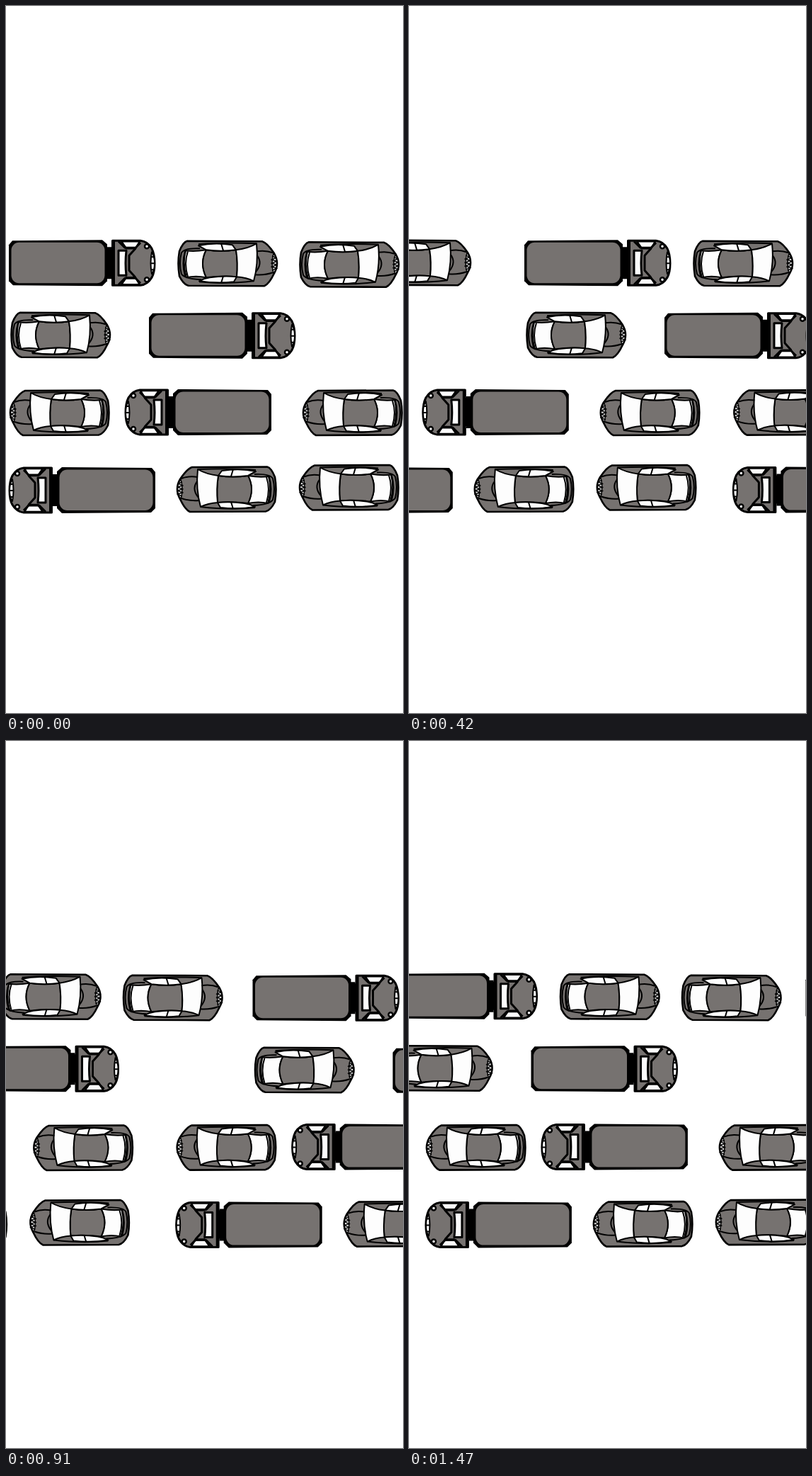
Animation of 561 by 998 pixels, one loop 1.54 s. Source, as an HTML page:

```html
<!DOCTYPE html>
<html lang="en">
<head>
<meta charset="utf-8">
<title>Traffic</title>
<style>
  html, body { margin: 0; width: 100%; height: 100%; overflow: hidden; background: #fff; }
  svg { display: block; width: 100vw; height: 100vh; }
  .line { fill: none; }
  .glass { fill: #fdfdfd; }
  .ink { fill: #000; stroke: none; }
</style>
</head>
<body>
<svg viewBox="0 0 561 998">
  <defs>
    <g id="car" fill="#767270" stroke="#000" stroke-width="2" stroke-linejoin="round">
      <path stroke-width="2.6" d="M14 1.5 L120 2 Q127 4 137 19 Q145 33 137 47 Q130 62 123 65 L16 64.5 Q9 63 3 51 Q0 33 3 16 Q8 3 14 1.5Z"/>
      <path class="line" d="M32 12 Q10 11 6 18 Q2 33 6 48 Q10 55 34 56 M28 16 H11 Q6 33 11 51 H30"/>
      <path class="glass" d="M12 15 Q24 17 41 14 Q31 33 41 53 Q26 50 13 53 Q7 33 12 15Z"/>
      <path class="line" d="M15 16 Q9 33 15 52"/>
      <path d="M41 14 Q62 17 83 14 Q86 33 84 52 Q62 50 41 53 Q31 33 41 14Z"/>
      <path class="glass" d="M83 14 Q100 12 112 5 Q115 33 108 58 Q98 53 84 52 Q86 33 83 14Z"/>
      <path class="glass" d="M30 8 Q52 3 78 7 L83 14 Q62 17 41 14Z"/>
      <path class="glass" d="M31 58 Q38 54 46 53 Q66 50 84 52 L80 59 Q56 62 31 58Z"/>
      <path class="line" d="M30 6 Q62 3 112 5 M31 59 Q66 63 108 58 M62 5 L65 15 M62 61 L65 51"/>
      <path class="line" d="M112 16 Q125 14 135 18 M110 49 Q124 50 135 46 M113 22 Q121 33 111 45"/>
      <path class="glass" stroke-width="1.5" d="M136 19 Q132 33 136 47 L139 42 Q142 33 139 24Z"/>
      <path class="line" stroke-width="1.5" d="M134 23 L140 25 L133 28 L141 30 L133 33 L141 35 L133 38 L141 40 L134 43"/>
    </g>
    <g id="truck" fill="#767270" stroke="#000" stroke-width="3" stroke-linejoin="round">
      <path class="ink" d="M137 10 h8 v2 h7 v40 h-7 v3 h-8Z"/>
      <path class="ink" d="M5 1 L132 0 L139 6 V58 L132 65 L6 64 L0 58 V7Z"/>
      <rect x="3.5" y="3.500" width="132" height="57.500" rx="11" stroke="none"/>
      <path d="M146.500 1 H186 Q196 2 202 12 Q206 20 206 33 Q206 46 202 53 Q196 63 186 64 H146.500Z"/>
      <path class="glass" stroke-width="2.500" d="M159 2 H185 L179 12 H166Z M159 63 H185 L179 53 H166Z"/>
      <path class="glass" d="M155 15 H166 Q164 33 166 50 H155Z"/>
      <path class="line" stroke-width="4" d="M148 1 V64"/>
      <path class="line" d="M155 2 L164 11 H179 L186 4 M155 63 L164 54 H179 L186 61 M179 12 L170 22 V43 L179 53"/>
      <path class="glass" stroke-width="2" d="M202 17 Q199 33 202 48 Q206 43 206 33 Q206 23 202 17Z"/>
      <path class="line" stroke-width="2" d="M201 24 h4 M201 33 h5 M201 42 h4"/>
      <circle class="glass" cx="195" cy="9" r="3" stroke-width="2.500"/>
      <circle class="glass" cx="195" cy="56" r="3" stroke-width="2.500"/>
    </g>
  </defs>
</svg>
<script>
const svg = document.querySelector('svg');
const FRAME = 70, COUNT = 22, HOP_STEP = 13;
const WIDTH = { car: 142, truck: 207 };

const eastbound = [
  ['truck', 5, 331], ['car', 243, 331], ['car', 415, 332.5],
  ['car', 7, 432], ['truck', 203, 433.5]
];
const westbound = [
  ['car', 5, 541], ['truck', 168, 541], ['car', 419, 541],
  ['truck', 4, 651], ['car', 241, 649], ['car', 414, 646.5]
];

// Steady travel, with one sudden hop partway through the loop.
const drift = (start, speed, hop) => step => start + speed * step + (step >= HOP_STEP ? hop : 0);
const leavingWest = drift(14, -27.2, -41);

// Each direction has a leaving and an arriving convoy.
const convoys = [
  convoy(eastbound, false, drift(-1, 26.5, 0), -.7),
  convoy(eastbound, false, drift(-634, 27.5, 26), -3.3),
  convoy(westbound, true, step => Math.min(0, leavingWest(step)), 0),
  convoy(westbound, true, drift(616, -27.1, -28), -.4)
];

function add(parent, tag, attributes = {}) {
  const node = document.createElementNS('http://www.w3.org/2000/svg', tag);
  for (const name in attributes) node.setAttribute(name, attributes[name]);
  return parent.appendChild(node);
}

function convoy(vehicles, flipped, travel, y) {
  const node = add(svg, 'g');
  for (const [kind, left, top] of vehicles) {
    const place = flipped
      ? `translate(${left + WIDTH[kind]} ${top}) scale(-1 1)`
      : `translate(${left} ${top})`;
    add(node, 'use', { href: '#' + kind, transform: place });
  }
  return { node, travel, y };
}

function draw() {
  const step = Math.floor(performance.now() / FRAME) % COUNT;
  for (const { node, travel, y } of convoys)
    node.setAttribute('transform', `translate(${travel(step)} ${y})`);
  requestAnimationFrame(draw);
}
draw();
</script>
</body>
</html>
```
